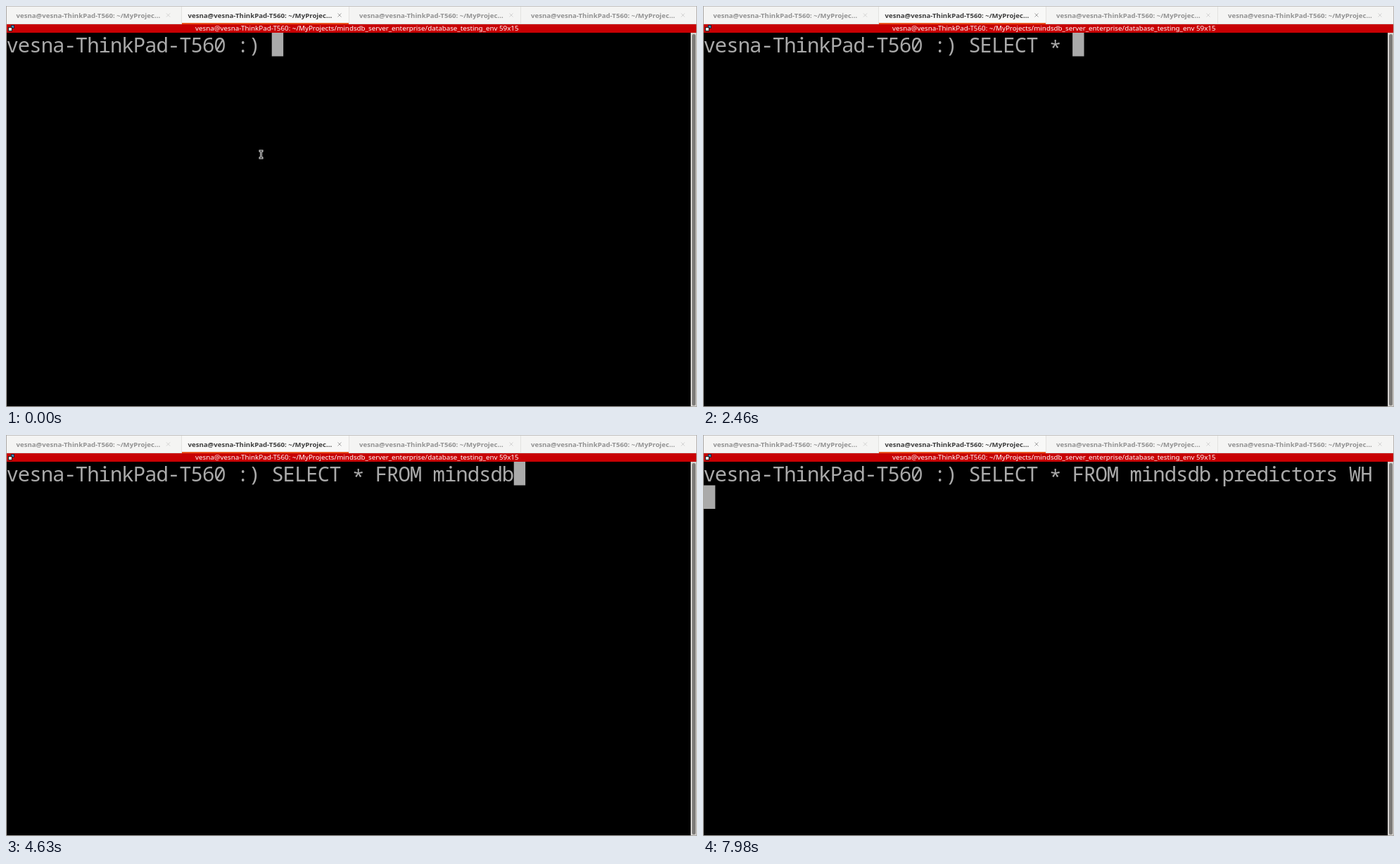
Write an HTML page with a canvas that moves like this. It is 982x570 px and loops after 8000 ms.

```html
<!DOCTYPE html>
<html lang="en">
<head>
<meta charset="utf-8">
<title>Terminal</title>
<style>
  html, body { margin: 0; width: 100%; height: 100%; overflow: hidden; background: #000; }
  canvas { display: block; width: 982px; height: 570px; }
</style>
</head>
<body>
<canvas id="stage" width="982" height="570"></canvas>
<script>
const ctx = document.getElementById('stage').getContext('2d');
const LOOP = 8000;
const CELL = 16.38, ROW = 33.5, LEFT = 1, TOP = 38;
const GREY = '#aaaaaa';
const SANS = '"Noto Sans", "Open Sans", sans-serif';
const MONO = '29px "Noto Sans Mono", "DejaVu Sans Mono", monospace';
const USER = 'vesna';
const HOST = USER + '-ThinkPad-T560';
const PROMPT = HOST + ' :) ';
const TAB_TITLE = USER + '@' + HOST + ': ~/MyProjec...';
const TITLE = USER + '@' + HOST +
  ': ~/MyProjects/mindsdb_server_enterprise/database_testing_env 59x15';

// Bursts of typing: first key, last key, keys
const BURSTS = [
  [610, 610, 'S'], [900, 1190, 'ELE'], [1490, 1490, 'C'], [1780, 1780, 'T'],
  [2070, 2850, ' * FRO'], [3150, 3350, 'M '], [3640, 4630, 'mindsdb'],
  [4820, 4820, '.'], [5120, 5510, 'pred'], [5610, 5710, 'ic'],
  [6010, 6390, 'tors'], [6990, 6990, ' '], [7290, 7290, 'WH']
];
const POINTER_HIDES = 310;
const BLINKS = [[410, 610], [7790, 7980]];
const WRAP = 7980;

function rect(x, y, w, h, color) {
  ctx.fillStyle = color;
  ctx.fillRect(x, y, w, h);
}

// Font whose size gives the text its natural width
function fitFont(text, width, weight) {
  ctx.font = `${weight} 10px ${SANS}`;
  const size = 10 * width / ctx.measureText(text).width;
  return `${weight} ${size.toFixed(2)}px ${SANS}`;
}

const tabFont = fitFont(TAB_TITLE, 205, 700);
const titleFont = fitFont(TITLE, 460, 400);

function label(text, x, y, font, color) {
  ctx.font = font;
  ctx.fillStyle = color;
  ctx.textAlign = 'left';
  ctx.fillText(text, x, y);
}

function closeMark(x, y, color) {
  ctx.strokeStyle = color;
  ctx.lineWidth = 1;
  ctx.beginPath();
  ctx.moveTo(x - 2.5, y - 2.5);
  ctx.lineTo(x + 2.5, y + 2.5);
  ctx.moveTo(x + 2.5, y - 2.5);
  ctx.lineTo(x - 2.5, y + 2.5);
  ctx.stroke();
}

function drawTabs() {
  rect(0, 0, 982, 26, '#f4f4f3');
  rect(250, 1, 237, 25, '#f8f8f7');
  rect(0, 0, 982, 1, '#c4c3c1');
  for (const x of [249, 487, 731]) rect(x, 1, 1, 24, '#e3e2e0');
  [14.5, 258.5, 502, 746].forEach((x, i) => {
    const active = i === 1;
    label(TAB_TITLE, x, 16.5, tabFont, active ? '#3d3d3d' : '#929292');
    closeMark([230.5, 474, 718, 962][i], 13, active ? '#a3a3a3' : '#d2d2d2');
  });
  rect(0, 25, 982, 1, '#dad7d4');
  rect(250, 24, 237, 2, '#e95420');
}

function drawTitle() {
  rect(0, 26, 982, 12, '#c80003');
  label(TITLE, 269, 35.3, titleFont, '#ffffff');
  rect(7, 27, 5, 5, '#1d2b3a');
  rect(8, 28, 3, 3, '#3f87b8');
  rect(3, 30, 6, 6, '#222222');
  rect(4, 31, 4, 4, '#e4e4e4');
}

function drawFrame() {
  rect(973, 38, 8, 532, '#d3d0cd');
  ctx.fillStyle = '#7d7b79';
  ctx.beginPath();
  ctx.roundRect(975, 40, 5, 528, 2.5);
  ctx.fill();
  rect(0, 0, 1, 570, '#aaa8a5');
  rect(981, 0, 1, 570, '#b5b2af');
  rect(0, 569, 982, 1, '#aaa8a5');
}

function drawPointer() {
  const parts = [[360, 205, 5, 2], [361.5, 206, 2, 10], [360, 215, 5, 2]];
  for (const [x, y, w, h] of parts) rect(x - 0.5, y - 0.5, w + 1, h + 1, '#d8d8d8');
  rect(360.5, 205.5, 4, 1, '#222');
  rect(362, 206, 1, 10, '#222');
  rect(360.5, 215.5, 4, 1, '#222');
}

function typed(t) {
  let text = '';
  for (const [start, end, keys] of BURSTS) {
    const step = keys.length > 1 ? (end - start) / (keys.length - 1) : 0;
    for (let i = 0; i < keys.length; i++) {
      if (t >= start + i * step - 0.01) text += keys[i];
    }
  }
  return text;
}

function drawShell(t) {
  const line = PROMPT + typed(t);
  ctx.font = MONO;
  ctx.textAlign = 'center';
  ctx.fillStyle = GREY;
  [...line].forEach((ch, i) => {
    const drop = ch === '*' ? 3.5 : 0;
    ctx.fillText(ch, LEFT + (i + 0.5) * CELL, 66 + drop);
  });
  if (BLINKS.some(([off, on]) => t >= off && t < on)) return;
  const wrapped = t >= WRAP;
  const col = wrapped ? 0 : line.length;
  rect(LEFT + col * CELL, TOP + (wrapped ? ROW : 0), CELL, ROW, GREY);
}

function draw(t) {
  rect(0, 0, 982, 570, '#000');
  drawTabs();
  drawTitle();
  drawFrame();
  drawShell(t);
  if (t < POINTER_HIDES) drawPointer();
}

const begin = performance.now();
function tick() {
  draw((performance.now() - begin) % LOOP);
  requestAnimationFrame(tick);
}
draw(0);
requestAnimationFrame(tick);
</script>
</body>
</html>
```
